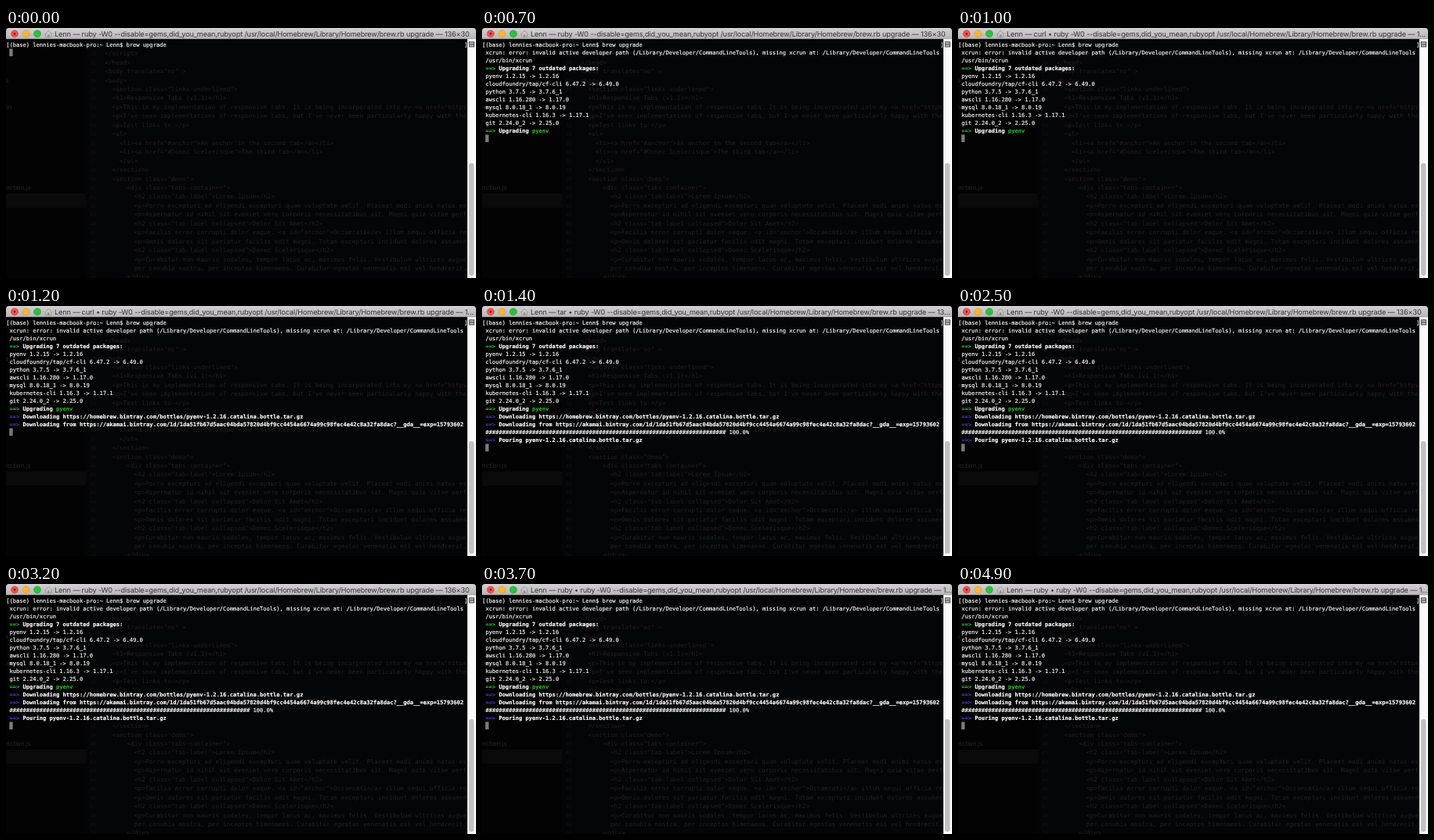
Animation of 600 by 320 pixels, one loop 5 s. Source, as an HTML page:

```html
<!DOCTYPE html>
<html lang="en">
<head>
<meta charset="utf-8">
<title>Terminal upgrade</title>
<style>
html, body { margin: 0; width: 100%; height: 100%; overflow: hidden; background: #000; }
svg { display: block; width: 600px; height: 320px; }
text { white-space: pre; text-rendering: geometricPrecision; }
.mono { font-family: "DejaVu Sans Mono", monospace; }
#code { font-size: 7.84px; fill: #232122; }
#code .tag { fill: #261d1e; }
#side { font-family: Inter, sans-serif; font-size: 8px; fill: #272727; }
#term { font-size: 7.096px; fill: #fff; stroke: #fff; stroke-width: .16px; }
#term .b { font-weight: bold; }
#term .g { font-weight: bold; fill: #2cc82c; stroke: none; }
#term .u { font-weight: bold; fill: #5236d2; stroke: none; }
#name { font-family: Inter, sans-serif; font-size: 9.1px; letter-spacing: -.115px; fill: #343234; }
</style>
</head>
<body>
<svg viewBox="0 0 600 320">
  <defs>
    <linearGradient id="bar" x2="0" y2="1">
      <stop offset="0" stop-color="#d2d0d2"/>
      <stop offset="1" stop-color="#b8b6b8"/>
    </linearGradient>
    <clipPath id="view"><rect y="14" width="589" height="306"/></clipPath>
  </defs>
  <rect width="600" height="320" fill="#030304"/>
  <g clip-path="url(#view)">
    <rect x="102" y="14" width="487" height="306" fill="#040506"/>
    <rect y="212" width="102" height="18" fill="#0a0a0a"/>
    <g id="side">
      <text x="-5" y="70">.js</text>
      <text x="-2" y="104">on</text>
      <text x="0" y="207">nction.js</text>
    </g>
    <g id="code" class="mono"></g>
  </g>
  <g id="term" class="mono"></g>
  <rect id="cursor" x="4.3" width="4.3" height="9.6" fill="#7c7c7c"/>
  <rect x="589" y="14" width="11" height="306" fill="#fafafa"/>
  <rect x="590.8" y="173" width="6.6" height="144" rx="3.3" fill="#c1c1c1"/>
  <g fill="#b5b5b5" stroke="#3c3c3c" stroke-width=".9">
    <rect x="591.2" y="17.8" width="6.2" height="6.2"/>
    <path d="M591.2 20.9H597.4"/>
  </g>
  <path d="M0 14V4Q0 0 4 0H596Q600 0 600 4V14Z" fill="url(#bar)"/>
  <path d="M0 13.8H600" stroke="#969496" stroke-width=".6"/>
  <g stroke-width=".6">
    <circle cx="11" cy="7.4" r="4.5" fill="#f4504a" stroke="#d53c38"/>
    <circle cx="25.6" cy="7.4" r="4.5" fill="#f6b437" stroke="#d5982f"/>
    <circle cx="40" cy="7.4" r="4.5" fill="#2dbd42" stroke="#239e31"/>
  </g>
  <circle cx="11" cy="7.4" r="1.3" fill="#7c1a16"/>
  <path d="M49.5 7.9L54.3 3.4L59 7.9H57.7V11.7H50.8V7.9Z" fill="#c9c5c0" stroke="#8d8884" stroke-width=".7"/>
  <rect x="53.2" y="8.4" width="2.2" height="3.3" fill="#8d8884"/>
  <text id="name" x="62" y="10.8"></text>
</svg>
<script>
const $ = id => document.getElementById(id);
const NS = "http://www.w3.org/2000/svg";

function add(parent, tag, attrs, str = "") {
  const el = document.createElementNS(NS, tag);
  for (const k in attrs) el.setAttribute(k, attrs[k]);
  el.textContent = str;
  return parent.appendChild(el);
}

// Dim editor page behind the terminal: indent in columns, then text
const page = [
  [0, '<\/script>'],
  [0, '</head>'],
  [0, '<body translate="no" >'],
  [0, '<body>'],
  [2, '<section class="links-underlined">'],
  [2, '<h1>Responsive Tabs (v1.1)</h1>'],
  [2, '<p>This is my implementation of responsive tabs. It is being incorporated into my <a href="https:'],
  [2, "<p>I've seen implementations of responsive tabs, but I've never been particularly happy with them"],
  [2, '<p>Test links to:</p>'],
  [2, '<ul>'],
  [4, '<li><a href="#anchor">An anchor in the second tab</a></li>'],
  [4, '<li><a href="#Donec Scelerisque">The third tab</a></li>'],
  [4, '</ul>'],
  [2, '</section>'],
  [2, '<section class="demo">'],
  [6, '<div class="tabs-container">'],
  [8, '<h2 class="tab-label">Lorem Ipsum</h2>'],
  [8, '<p>Porro excepturi ad eligendi excepturi quam voluptate velit. Placeat modi animi natus est'],
  [8, '<p>Aspernatur id nihil sit eveniet vero corporis necessitatibus sit. Magni quia vitae perfe'],
  [8, '<h2 class="tab-label collapsed">Dolor Sit Amet</h2>'],
  [8, '<p>Facilis error corrupti dolor eaque. <a id="anchor">Occaecati</a> illum sequi officia rem'],
  [8, '<p>Omnis dolores sit pariatur facilis odit magni. Totam excepturi incidunt dolores assumend'],
  [8, '<h2 class="tab-label collapsed">Donec Scelerisque</h2>'],
  [8, '<p>Curabitur non mauris sodales, tempor lacus ac, maximus felis. Vestibulum ultrices augue'],
  [8, 'per conubia nostra, per inceptos himenaeos. Curabitur egestas venenatis est vel hendrerit.'],
  [6, '</div>']
];
page.forEach(([indent, str], i) => {
  const y = 35.2 + i * 11.45;
  add($("code"), "text", { x: 107, y, opacity: .4, "font-size": 6.5 }, 25 + i);
  const line = add($("code"), "text", { x: 126 + indent * 4.72, y });
  for (const part of str.split(/(<[^>]*>?)/))
    if (part) add(line, "tspan", part[0] === "<" ? { class: "tag" } : {}, part);
});

// Terminal rows: time of appearance, then [text, class] runs
const tools = "/Library/Developer/CommandLineTools";
const hash = "1da51fb67d5aac04bda57820d4bf9cc4454a6674a99c98fec4e42c8a32fa8dac";
const plain = (at, str) => ({ at, runs: [[str]] });
const head = (at, arrow, str, pkg = "") => ({ at, runs: [["==> ", arrow], [str, "b"], [pkg, "g"]] });
const rows = [
  plain(0, "(base) lennies-macbook-pro:~ Lenn$ brew upgrade"),
  plain(400, `xcrun: error: invalid active developer path (${tools}), missing xcrun at: ${tools}`),
  plain(400, "/usr/bin/xcrun"),
  head(700, "g", "Upgrading 7 outdated packages:"),
  ...[
    "pyenv 1.2.15 -> 1.2.16",
    "cloudfoundry/tap/cf-cli 6.47.2 -> 6.49.0",
    "python 3.7.5 -> 3.7.6_1",
    "awscli 1.16.280 -> 1.17.0",
    "mysql 8.0.18_1 -> 8.0.19",
    "kubernetes-cli 1.16.3 -> 1.17.1",
    "git 2.24.0_2 -> 2.25.0"
  ].map(str => plain(700, str)),
  head(700, "g", "Upgrading ", "pyenv"),
  head(1200, "u", "Downloading https://homebrew.bintray.com/bottles/pyenv-1.2.16.catalina.bottle.tar.gz"),
  head(1200, "u", `Downloading from https://akamai.bintray.com/1d/${hash}?__gda__=exp=15793602`),
  plain(1300, "#".repeat(72) + " 100.0%"),
  head(1400, "u", "Pouring pyenv-1.2.16.catalina.bottle.tar.gz")
];
rows.forEach((row, i) => {
  row.el = add($("term"), "text", { x: 4.4, y: 24 + i * 10 });
  for (const [str, cls] of row.runs) add(row.el, "tspan", cls ? { class: cls } : {}, str);
});
add($("term"), "text", { x: .3, y: 24 }, "[");
add($("term"), "text", { x: 585.3, y: 24 }, "]");

// Window title: [start, running job, visible size]
const jobs = [
  [0, "", "136×30"],
  [900, "curl • ", "1…"],
  [1400, "tar • ", "13…"],
  [1900, "ruby • ", "1…"],
  [2400, "", "136×30"],
  [3600, "ruby • ", "1…"]
];
const cmd = "ruby -W0 --disable=gems,did_you_mean,rubyopt /usr/local/Homebrew/Library/Homebrew/brew.rb upgrade";

function render(t) {
  let shown = 0;
  for (const row of rows) {
    const on = t >= row.at;
    row.el.setAttribute("visibility", on ? "visible" : "hidden");
    shown += on;
  }
  $("cursor").setAttribute("y", 16.5 + shown * 10);
  const [, job, size] = jobs.filter(j => t >= j[0]).pop();
  const title = `Lenn — ${job}${cmd} — ${size}`;
  if ($("name").textContent !== title) $("name").textContent = title;
}

const start = performance.now();
function tick() {
  render((performance.now() - start) % 5000);
  requestAnimationFrame(tick);
}
render(0);
requestAnimationFrame(tick);
</script>
</body>
</html>
```
